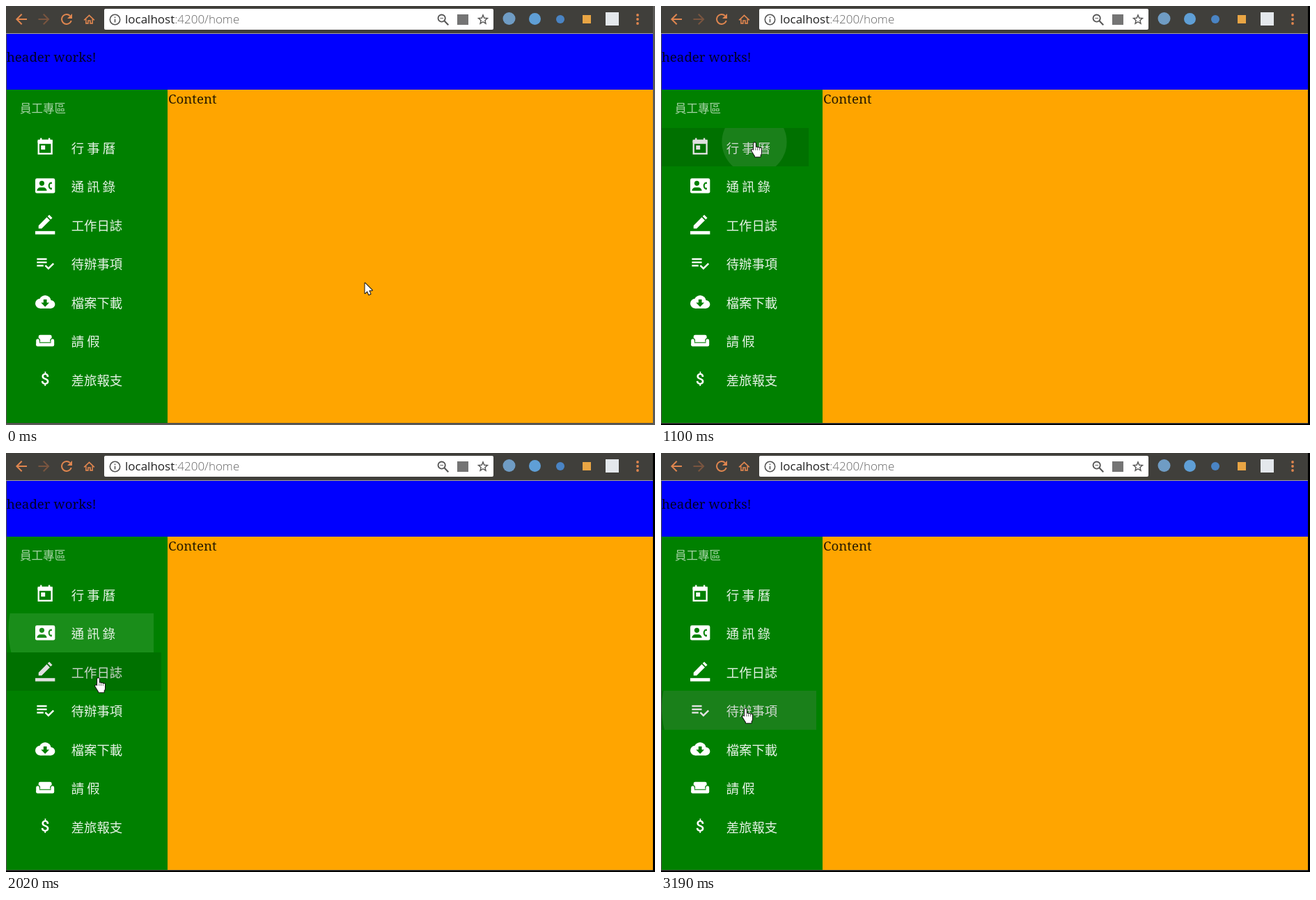
These frames come from a looping animation (932x601 px, 3280 ms). An HTML page with a canvas:

```html
<!DOCTYPE html>
<html lang="zh-Hant">
<head>
<meta charset="utf-8">
<title>Sidebar menu</title>
<style>
html, body { margin: 0; width: 100%; height: 100%; overflow: hidden; background: #000; }
canvas { display: block; }
</style>
</head>
<body>
<canvas id="stage" width="932" height="601"></canvas>
<script>
const ctx = document.getElementById('stage').getContext('2d');
const LOOP = 3280, TICK = 78, PHASE = 70;
const ENTER = 450, FADE = 400;
const CJK = '"Noto Sans CJK TC", "Noto Sans CJK JP", "Noto Sans CJK", sans-serif';
const SERIF = '300 18.7px "Noto Serif", serif';
const URL_FONT = '17px "Open Sans", sans-serif';
const GREEN = '#008000', ORANGE = '#e0864f', GRAY = '#555', INK = 'rgba(0,0,0,.85)';

// pointer glides: leave, arrive, x, y, click time
const GLIDES = [
  [150, 460, 156, 243],
  [460, 630, 134, 195, 1032],
  [1160, 1470, 136, 254, 1695],
  [1790, 2020, 132, 322, 2230],
  [2410, 2650, 121, 366, 2845]
];

// ---- drawing helpers ----
function paint(color) {
  ctx.fillStyle = ctx.strokeStyle = color;
}

function box(x, y, w, h, r = 0) {
  ctx.beginPath();
  ctx.roundRect(x, y, w, h, r);
  ctx.fill();
}

function rect(color, x, y, w, h) {
  paint(color);
  ctx.fillRect(x, y, w, h);
}

function disc(x, y, r) {
  ctx.beginPath();
  ctx.arc(x, y, r, 0, 7);
  ctx.fill();
}

function arc(width, x, y, r, from = 0, to = 7, back = false) {
  ctx.lineWidth = width;
  ctx.beginPath();
  ctx.arc(x, y, r, from, to, back);
  ctx.stroke();
}

function trace(pts) {
  ctx.beginPath();
  for (let i = 0; i < pts.length; i += 2) ctx.lineTo(pts[i], pts[i + 1]);
}

function line(width, ...pts) {
  trace(pts);
  ctx.lineWidth = width;
  ctx.stroke();
}

function poly(...pts) {
  trace(pts);
  ctx.fill();
}

function text(str, font, color, x, y) {
  ctx.font = font;
  paint(color);
  ctx.fillText(str, x, y);
  return ctx.measureText(str).width;
}

// ---- icons on a 24 unit grid; menu icons cut holes with the panel colour ----
const ICONS = {
  back() {
    line(2, 20, 12, 5.5, 12);
    line(2, 12.7, 4.7, 5.4, 12, 12.7, 19.3);
  },
  forward() {
    ctx.translate(24, 0);
    ctx.scale(-1, 1);
    ICONS.back();
  },
  reload() {
    arc(2, 12, 12, 7, -0.8, 0.29, true);
    poly(20, 4, 20, 11, 13, 11);
  },
  home() {
    line(2.2, 2.5, 13, 12, 4, 21.5, 13);
    line(2, 6, 11, 6, 19, 10, 19, 10, 14, 14, 14, 14, 19, 18, 19, 18, 11);
  },
  info() {
    arc(2, 12, 12, 9);
    box(11, 7, 2, 2);
    box(11, 11, 2, 6);
  },
  zoomOut() {
    arc(2, 9.5, 9.5, 5.5);
    line(2.2, 13.8, 13.8, 19.8, 19.8);
    box(7, 9, 5, 1);
  },
  star() {
    const pts = [];
    for (let i = 0; i < 10; i++) {
      const r = i % 2 ? 3.7 : 8.3, a = i * Math.PI / 5;
      pts.push(12 + r * Math.sin(a), 12.5 - r * Math.cos(a));
    }
    trace(pts);
    ctx.closePath();
    ctx.lineWidth = 1.7;
    ctx.stroke();
  },
  today() {
    ctx.lineWidth = 2;
    ctx.strokeRect(4, 4, 16, 16);
    box(3, 3, 18, 5, 2);
    box(6, 1, 2, 3);
    box(16, 1, 2, 3);
    box(7, 10, 5, 5);
  },
  contact() {
    box(0, 3, 24, 18, 2);
    paint(GREEN);
    disc(8, 9, 3);
    box(2, 14, 12, 4, [5, 5, 0, 0]);
    arc(1.7, 21.5, 12, 4.8, 2.3, 3.98);
    line(2.3, 18.2, 8.7, 20.2, 8.5);
    line(2.3, 18.2, 15.3, 20.2, 15.5);
  },
  pencil() {
    poly(4, 17, 4, 13.25, 14, 3.25, 17.75, 7, 7.75, 17);
    line(5.3, 16.9, 4.1, 18.9, 2.1);
    box(0, 20, 24, 4);
  },
  checklist() {
    box(2, 6, 12, 2);
    box(2, 10, 12, 2);
    box(2, 14, 8, 2);
    line(2.1, 12.2, 14.8, 16, 18.5, 22.2, 12.3);
  },
  cloud() {
    disc(6, 14, 6);
    disc(12, 11.3, 7.3);
    disc(19, 15, 5);
    box(6, 14, 13, 6);
    paint(GREEN);
    box(10, 9, 4, 4.5);
    poly(7, 13, 17, 13, 12, 18);
  },
  sofa() {
    box(4, 5, 16, 10, 2);
    paint(GREEN);
    box(0, 9, 6, 6, 3);
    box(18, 9, 6, 6, 3);
    box(4, 14, 16, 1);
    paint('#fff');
    box(1, 10, 4, 9, 2);
    box(19, 10, 4, 9, 2);
    box(1, 15, 22, 4, 2);
  },
  money() {
    text('$', '500 19px Roboto, sans-serif', '#fff', 6.6, 18.8);
  }
};

function icon(name, color, cx, cy, scale = 1) {
  ctx.save();
  ctx.translate(cx - 12 * scale, cy - 12 * scale);
  ctx.scale(scale, scale);
  paint(color);
  ICONS[name]();
  ctx.restore();
}

// ---- pointer shapes, tip at the origin ----
const ARROW = new Path2D('M0 0V14.5L3.3 11.4 5.6 16.6 8 15.6 5.8 10.5 10.3 10.2Z');
const HAND = new Path2D('M-4.6 11.4L-2.8 10.6 1 14V19H0Z');
HAND.roundRect(-1.4, 0.4, 2.8, 14, 1.4);
for (let i = 1; i < 4; i++) HAND.roundRect(-1.4 + 2.7 * i, 6.4 + 0.6 * i, 2.8, 8, 1.4);
HAND.roundRect(-1.4, 10, 10.9, 8.6, 3);
HAND.roundRect(0.4, 14, 7.8, 6.8, 0.5);

function cursor(p, shape) {
  ctx.save();
  ctx.translate(p.x + 0.5, p.y + 0.5);
  ctx.lineWidth = 2;
  ctx.lineJoin = 'round';
  paint('#111');
  ctx.stroke(shape);
  paint('#fff');
  ctx.fill(shape);
  if (shape === HAND) {
    paint('#333');
    for (let i = 0; i < 3; i++) box(1 + 2.7 * i, 8, 0.7, 3.5);
  }
  ctx.restore();
}

// ---- menu ----
const MENU = [
  ['today', '行 事 曆'], ['contact', '通 訊 錄'], ['pencil', '工作日誌'],
  ['checklist', '待辦事項'], ['cloud', '檔案下載'], ['sofa', '請 假'], ['money', '差旅報支']
];
const rowTop = i => Math.floor(175 + 55.5 * i);
const rowRight = i => i < 2 ? 212 : 223;
const rowAt = y => Math.floor((y - 175) / 55.5);

// ---- motion ----
const clamp = x => Math.min(1, Math.max(0, x));
const smooth = x => x * x * (3 - 2 * x);

// cubic-bezier(0, 0, .2, 1)
function ease(x) {
  x = clamp(x);
  let lo = 0, hi = 1;
  for (let i = 0; i < 24; i++) {
    const s = (lo + hi) / 2;
    if (0.6 * (1 - s) * s * s + s ** 3 < x) lo = s; else hi = s;
  }
  return hi * hi * (3 - 2 * hi);
}

function pointer(t) {
  let x = 515, y = 397;
  for (const [leave, arrive, toX, toY] of GLIDES) {
    const k = smooth(clamp((t - leave) / (arrive - leave)));
    x += (toX - x) * k;
    y += (toY - y) * k;
  }
  return { x: Math.round(x), y: Math.round(y) };
}

function ripple(t, x, y, start) {
  if (t < start || t > start + ENTER + FADE) return;
  const row = rowAt(y), top = rowTop(row), bottom = rowTop(row + 1), right = rowRight(row);
  const full = Math.hypot(Math.max(x - 1, right - x), Math.max(y - top, bottom - y));
  ctx.save();
  ctx.beginPath();
  ctx.rect(1, top, right - 1, bottom - top);
  ctx.clip();
  ctx.globalAlpha = 0.1 * (1 - ease((t - start - ENTER) / FADE));
  paint('#fff');
  disc(x, y, full * ease((t - start) / ENTER));
  ctx.restore();
}

// ---- scene ----
function toolbar() {
  rect('#403f3b', 0, 0, 929, 39);
  icon('back', ORANGE, 22, 19);
  icon('forward', '#79553f', 54.5, 19);
  icon('reload', ORANGE, 87, 19);
  icon('home', ORANGE, 119.5, 19.5, 0.77);

  paint('#fff');
  box(141, 4, 559, 30, 2);
  icon('info', GRAY, 156.5, 19.5, 0.8);
  const w = text('localhost', URL_FONT, '#222', 171, 25);
  text(':4200/home', '300 ' + URL_FONT, '#666', 171 + w, 25);
  icon('zoomOut', GRAY, 628, 19.9, 0.93);
  rect('#747474', 648, 12, 16, 15);
  icon('star', GRAY, 685, 19.3, 0.82);

  paint('#6f9cc4');
  disc(722.5, 18, 9);
  paint('#5f9fd6');
  disc(759.5, 18.5, 8.5);
  paint('#4a84c4');
  disc(796, 19, 6);
  rect('#e9a544', 828, 13, 12, 12);
  rect('#e4e8ec', 861, 9, 19, 19);
  paint(ORANGE);
  for (let i = -1; i < 2; i++) disc(907, 19 + 6 * i, 1.9);
}

function page() {
  rect('#a3a19d', 0, 39, 929, 1);
  rect('#00f', 1, 40, 928, 80);
  rect(GREEN, 1, 120, 231, 478);
  rect('#ffa500', 232, 120, 697, 478);
  text('header works!', SERIF, INK, 1, 80);
  text('Content', SERIF, INK, 233, 140);
  text('員工專區', '300 16.5px ' + CJK, 'rgba(255,255,255,.65)', 20, 153);
  MENU.forEach(([name, label], i) => {
    icon(name, '#fff', 56.2, 202.4 + 55.5 * i, 1.18);
    text(label, '300 18.4px ' + CJK, 'rgba(255,255,255,.9)', 93.7, 210.5 + 55.5 * i);
  });
}

function draw(clock) {
  // the screen refreshes on a coarse, even beat
  const t = Math.max(0, PHASE + TICK * Math.floor((clock - PHASE) / TICK));

  rect(t < 1000 ? '#5c5b58' : '#000', 0, 0, 932, 601);
  rect('#4c4b48', 0, 40, 1, 559);
  rect('#4c4b48', 0, 598, 929, 1);
  toolbar();
  page();

  const p = pointer(t), row = rowAt(p.y);
  const over = row >= 0 && row < MENU.length && p.x < rowRight(row);
  if (over) rect('rgba(0,0,0,.12)', 1, rowTop(row), rowRight(row) - 1, rowTop(row + 1) - rowTop(row));
  for (const [, , x, y, click] of GLIDES) if (click) ripple(t, x, y, click);
  cursor(p, over ? HAND : ARROW);
}

const begin = performance.now();
function tick() {
  draw((performance.now() - begin) % LOOP);
  requestAnimationFrame(tick);
}
tick();
</script>
</body>
</html>
```
